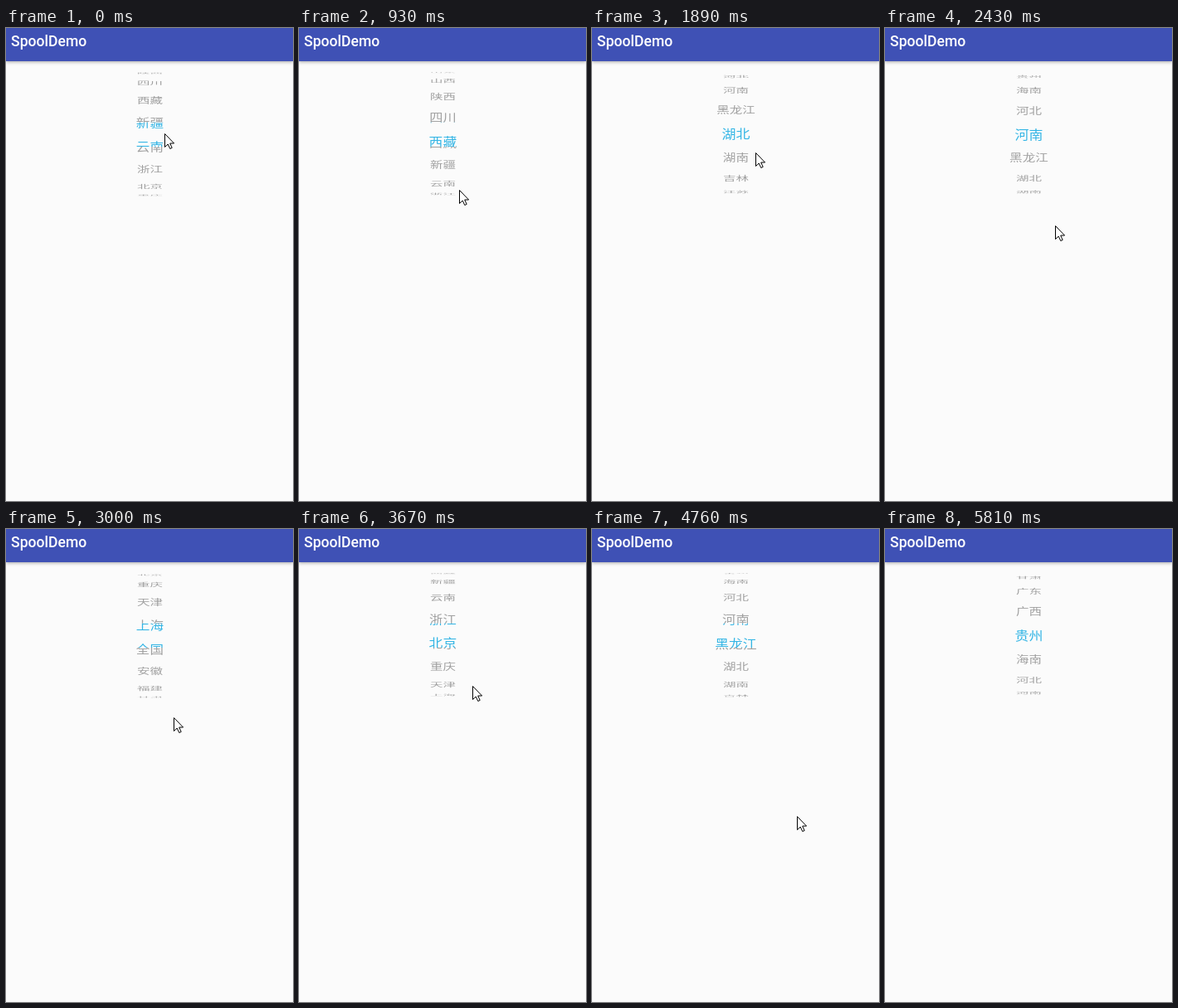
An HTML page with a canvas for the animation above (6.09 s loop, 346 by 570 pixels).

```html
<!DOCTYPE html>
<html lang="zh-CN">
<head>
<meta charset="utf-8">
<title>Wheel picker</title>
<style>
  html, body { margin: 0; width: 346px; height: 570px; overflow: hidden; background: #fbfbfb; }
  canvas { position: absolute; left: 0; top: 0; }
  header {
    position: absolute; width: 340px; height: 40px; padding-left: 6px;
    background: #3f51b5; color: #fff; box-shadow: 0 1px 4px rgba(0, 0, 0, .35);
    font: 500 17.6px/32px Roboto, sans-serif;
  }
</style>
</head>
<body>
<header>SpoolDemo</header>
<canvas id="stage" width="346" height="570"></canvas>
<script>
const ctx = document.getElementById('stage').getContext('2d');
const LOOP = 6090, HOLD = 135, LEAD = 20; // ms; the picture is held for HOLD
const ITEMS = ('全国 安徽 福建 甘肃 广东 广西 贵州 海南 河北 河南 黑龙江 湖北 湖南 吉林 江苏 江西 ' +
  '辽宁 内蒙古 宁夏 青海 山东 山西 陕西 四川 西藏 新疆 云南 浙江 北京 重庆 天津 上海').split(' ');
const GREY = '#a0a0a0', BLUE = '#33b5e5';
const CENTER = { x: 173.4, y: 128.4 }, RADIUS = 75, ROW_ANGLE = Math.PI / 8;
const BAND = RADIUS * Math.sin(ROW_ANGLE / 2);

// The wheel turns slowly under the finger, with flings on top: [first step, steps, rows].
const FIRST_ITEM = 25.5, DRIFT = .2586, REST = 41;
const FLINGS = [[11, 3, 10.84], [17, 5, 9.52], [23, 4, 2.48], [31, 4, 15.94], [35, 6, 2.12]];

// Turning points of the pointer: [step, x, y]
const POINTER = [[0, 191, 127], [8, 193, 205], [11, 193, 140], [12, 195, 269], [14, 197, 150],
  [17, 210, 287], [20, 194, 140], [22, 202, 227], [23, 203, 241], [26, 208, 168], [30, 213, 250],
  [31, 214, 160], [34, 247, 346], [36, 247, 346], [41, 317, 563]];
const POINTER_GONE = 43;

const clamp = u => Math.min(1, Math.max(0, u));
const smooth = u => u * u * (3 - 2 * u);

function wheelPosition(step) {
  const dragged = FIRST_ITEM - DRIFT * Math.min(step, REST);
  return FLINGS.reduce((p, [from, length, rows]) =>
    p - rows * smooth(clamp((step - from) / length)), dragged);
}

function pointerAt(step) {
  const next = POINTER.findIndex(point => point[0] > step);
  if (next < 0) return POINTER[POINTER.length - 1].slice(1);
  const [t0, x0, y0] = POINTER[next - 1], [t1, x1, y1] = POINTER[next];
  const u = (step - t0) / (t1 - t0);
  return [x0 + (x1 - x0) * u, y0 + (y1 - y0) * u];
}

function drawRow(text, angle, color, top, bottom) {
  const size = 17 - 1.5 * clamp(Math.abs(angle) / ROW_ANGLE) ** 2;
  ctx.save();
  ctx.beginPath();
  ctx.rect(0, top, 346, bottom - top);
  ctx.clip();
  ctx.translate(CENTER.x, CENTER.y + RADIUS * Math.sin(angle));
  ctx.scale(1, .87 * Math.cos(angle) ** 1.5);
  ctx.font = `${size}px "Noto Sans CJK SC", "Noto Sans CJK", sans-serif`;
  ctx.fillStyle = color;
  ctx.fillText(text, 0, size * .38);
  ctx.restore();
}

function drawWheel(position) {
  const top = CENTER.y - BAND, bottom = CENTER.y + BAND;
  const count = ITEMS.length;
  ctx.textAlign = 'center';
  for (let i = Math.ceil(position - 3.7); i <= position + 3.7; i++) {
    const text = ITEMS[(i % count + count) % count];
    const angle = (i - position) * ROW_ANGLE;
    drawRow(text, angle, GREY, 50, top);
    drawRow(text, angle, BLUE, top, bottom);
    drawRow(text, angle, GREY, bottom, 206);
  }
}

const arrow = new Path2D('M.5 .5V16.5L4.2 13L6.8 18.5L9.2 17.4L6.7 12H11.6Z');

function drawPointer([x, y]) {
  ctx.save();
  ctx.translate(Math.round(x), Math.round(y));
  ctx.fillStyle = '#fff';
  ctx.strokeStyle = '#000';
  ctx.fill(arrow);
  ctx.stroke(arrow);
  ctx.restore();
}

const start = performance.now();
function frame() {
  const time = (performance.now() - start) % LOOP;
  const step = Math.floor((time + LEAD) / HOLD);
  ctx.clearRect(0, 0, 346, 570);
  drawWheel(wheelPosition(step));
  if (step < POINTER_GONE) drawPointer(pointerAt(step));
  requestAnimationFrame(frame);
}
frame();
</script>
</body>
</html>
```
